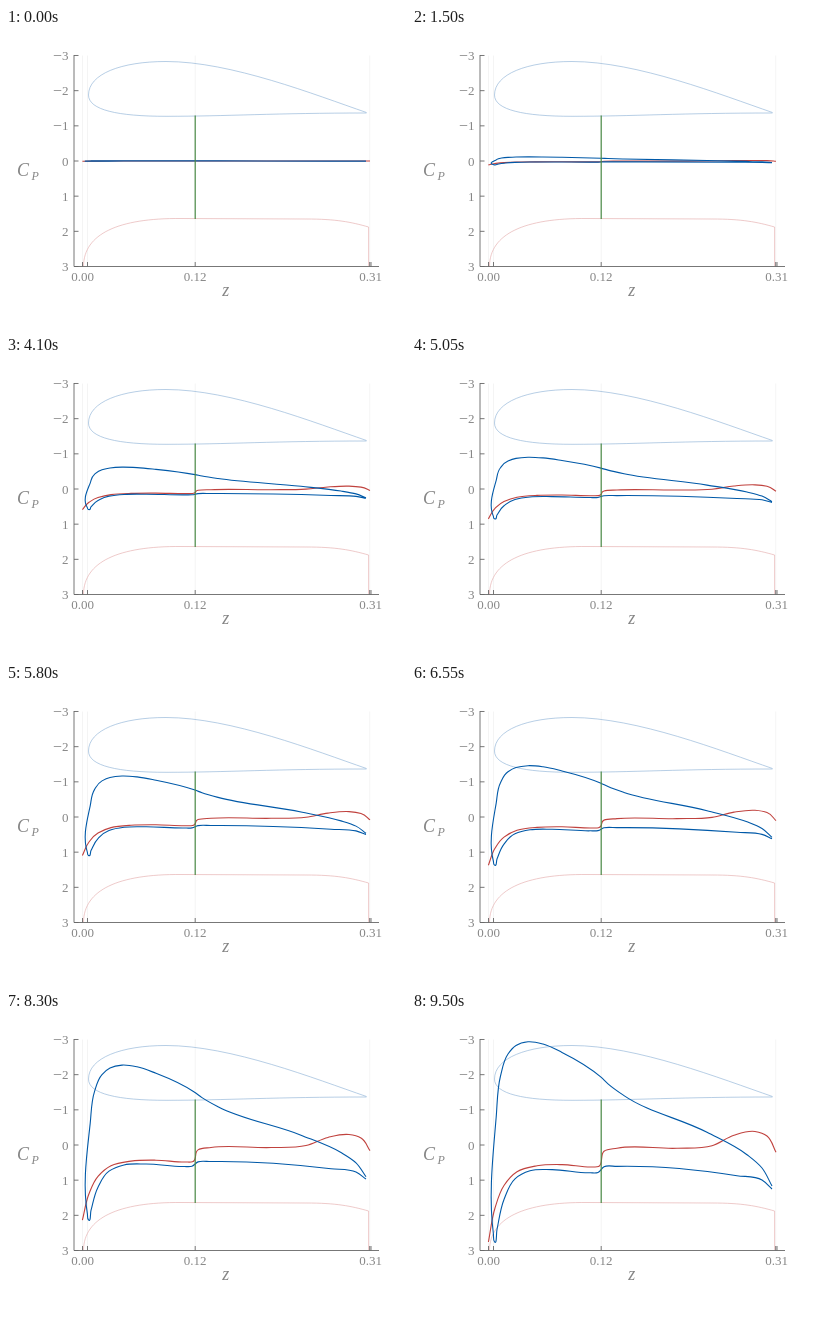
Animation of 400x300 px, one loop 9550 ms. Source, as an HTML page:

```html
<!DOCTYPE html>
<html lang="en">
<head>
<meta charset="utf-8">
<title>Pressure coefficient</title>
<style>
  html, body { margin: 0; width: 100%; height: 100%; overflow: hidden; background: #fff; }
  svg { display: block; width: 400px; height: 300px; }
  path { fill: none; stroke-linejoin: round; }
  text { font: 13px "Liberation Serif", "Times New Roman", serif; fill: #868686; }
  .mid { text-anchor: middle; }
  .end { text-anchor: end; }
  .var { font-size: 18px; font-style: italic; }
  .grid { stroke: #f1f1f1; stroke-width: .8; }
  .axis { stroke: #686868; stroke-width: .9; }
  .thin { stroke-width: .6; }
  .blue { stroke: #0059a8; }
  .red { stroke: #c0423e; }
  .thin.blue { stroke: #86aed4; }
  .thin.red { stroke: #e3a6a6; }
  .curve { stroke-width: 1.1; }
  .green { stroke: #4a8a46; stroke-width: 1.2; }
</style>
</head>
<body>
<svg viewBox="0 0 400 300">
  <path class="grid" d="M76.5 27.5V238M81.5 27.5V238M189.2 27.5V238M363.7 27.5V238"/>
  <path class="axis" id="axes"/>
  <g id="labels">
    <text class="mid" x="76.5" y="252.5">0.00</text>
    <text class="mid" x="189.2" y="252.5">0.12</text>
    <text class="mid" x="364.7" y="252.5">0.31</text>
    <text class="var" x="11" y="148">C</text>
    <text class="var" x="25.5" y="152" style="font-size:12px">P</text>
    <text class="var mid" x="219.7" y="268">z</text>
  </g>
  <path class="thin blue" d="M360.5 84.5C309 66.8 225 33.5 160 33.5C115 33.5 82.5 46 82.5 67C82.5 82 112 88.3 160 88.3C220 88.3 270 85 360.5 85"/>
  <path class="thin red" d="M77.5 238C78 206 112 190 175 190.5L300 191C330 191 345 194 362.6 199V238"/>
  <path class="curve red" id="duct"/>
  <path class="curve blue" id="foil"/>
  <path class="green" d="M189.2 87.5V191"/>
</svg>
<script>
  const $ = id => document.getElementById(id);
  const ZERO = 133, UNIT = 35.17, STEP = 50, STEPS = 191;

  // Turns key points into a chain of Bezier points with smooth joins
  function smooth(keys) {
    const p = keys.trim().split(/\s+/).map(s => s.split(',').map(Number));
    const leg = i => {
      const dx = p[i + 1][0] - p[i][0], dy = p[i + 1][1] - p[i][1];
      const len = Math.hypot(dx, dy);
      return { len, x: dx / len, y: dy / len };
    };
    const legs = p.slice(1).map((_, i) => leg(i));
    const tangent = i => {
      const a = legs[i - 1] || legs[i], b = legs[i] || a;
      const x = a.x * b.len + b.x * a.len, y = a.y * b.len + b.y * a.len;
      const len = Math.hypot(x, y);
      return [x / len, y / len];
    };
    const shift = (i, d) => p[i].map((c, j) => c + tangent(i)[j] * d);
    return legs.reduce((out, { len }, i) =>
      out.concat([shift(i, len / 3), shift(i + 1, -len / 3), p[i + 1]]), [p[0]]);
  }

  // Key points at full strength
  const curves = {
    foil: smooth(`360,174 350,156 335,142.7 295,120.3 212,83.6 196,71.8 189,65.2
      150,40.4 131,32 116,29.8 104,33.5 96,42 88.5,64 84.2,105 81.4,222 82.5,229.8
      85,217.5 92,187.5 103,166.8 118,158.8 140,157.6 178,160.8 186,160.4 192,154.8
      205,154.4 325,163.7 350,168 360,177`),
    duct: smooth(`76.4,230 83,196 92,173.5 105,159.8 125,153.8 150,152.6 180,155
      186.5,154.6 192,139.3 205,136.2 265,136.3 300,133.7 322,123.2 343,119.5
      355,124 364,140.3`)
  };

  const trace = (pts, k) => pts.map(([x, y], i) =>
    (i ? i === 1 ? 'C' : ' ' : 'M') +
    `${x.toFixed(2)} ${(ZERO + (y - ZERO) * k).toFixed(2)}`).join('');

  let axes = 'M68 27V238.5H373';
  for (let v = -3; v <= 3; v++) {
    const y = ZERO + v * UNIT;
    axes += `M68 ${y}h4.5`;
    const sign = v < 0 ? '<tspan font-size="16" dy="1">−</tspan><tspan dy="-1">' : '<tspan>';
    $('labels').insertAdjacentHTML('beforeend',
      `<text class="end" x="62.5" y="${y + 4.5}">${sign}${Math.abs(v)}</tspan></text>`);
  }
  for (const x of [76.5, 81.5, 189.2, 363.7, 365]) axes += `M${x} 238.5v-4.5`;
  $('axes').setAttribute('d', axes);

  // Pressure grows with the square of the speed
  function draw(now) {
    const n = Math.floor(now / STEP) % STEPS;
    const k = ((n + 10) / 200) ** 2;
    for (const id in curves) $(id).setAttribute('d', trace(curves[id], k));
  }
  const start = performance.now();
  function tick() {
    draw(performance.now() - start);
    requestAnimationFrame(tick);
  }
  tick();
</script>
</body>
</html>
```
